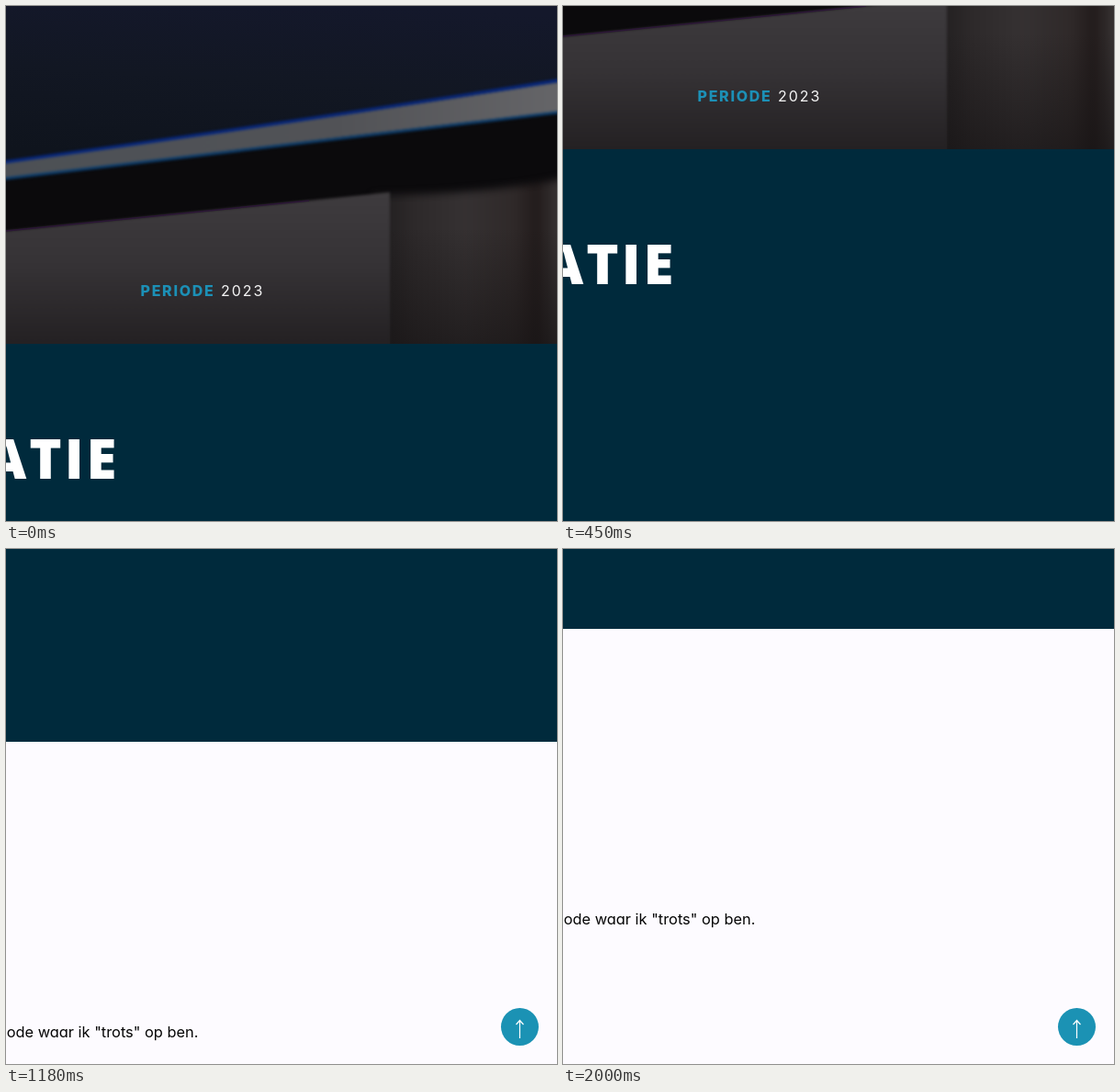
Recreate the animation shown at these times as an HTML page. Size 600 by 561 pixels, loop 2390 ms.

```html
<!DOCTYPE html>
<html lang="nl">
<head>
<meta charset="utf-8">
<title>Scrollende pagina</title>
<style>
  html, body { margin: 0; width: 100%; height: 100%; overflow: hidden; background: #fdfbff; }
  svg { display: block; width: 100vw; height: 100vh; }
  text { font-family: Inter, "Open Sans", sans-serif; }
  .title { font: 800 60px "Open Sans", Inter, sans-serif; letter-spacing: 3px; font-kerning: none; fill: #fff; text-anchor: end; }
  .period { font-size: 16px; letter-spacing: 2px; fill: #f4f4f4; }
  .label { font-weight: 800; letter-spacing: 1.7px; fill: #1c90b6; }
  .body { font-size: 16.4px; fill: #050505; text-anchor: end; font-feature-settings: "cv11"; }
</style>
</head>
<body>
<svg viewBox="0 0 600 561">
  <defs>
    <linearGradient id="sky" x1=".7" y1="0" x2=".5" y2="1">
      <stop offset="0" stop-color="#14182b"/>
      <stop offset=".5" stop-color="#121723"/>
      <stop offset="1" stop-color="#0f141d"/>
    </linearGradient>
    <linearGradient id="strip">
      <stop offset="0" stop-color="#4c5055"/>
      <stop offset=".6" stop-color="#515256"/>
      <stop offset="1" stop-color="#656568"/>
    </linearGradient>
    <linearGradient id="panel" x2="0" y2="1">
      <stop offset="0" stop-color="#3e3b3e"/>
      <stop offset=".45" stop-color="#353235"/>
      <stop offset="1" stop-color="#211e20"/>
    </linearGradient>
    <linearGradient id="curtain">
      <stop offset=".08" stop-color="#242122"/>
      <stop offset=".2" stop-color="#2d292a"/>
      <stop offset=".45" stop-color="#353132"/>
      <stop offset=".7" stop-color="#2f2929"/>
      <stop offset=".81" stop-color="#221b1b"/>
      <stop offset=".93" stop-color="#3a3636"/>
    </linearGradient>
    <linearGradient id="shade" x2="0" y2="1">
      <stop offset=".2" stop-color="#151213" stop-opacity="0"/>
      <stop offset="1" stop-color="#151213" stop-opacity=".6"/>
    </linearGradient>
    <filter id="soft" x="-10%" y="-10%" width="120%" height="120%" color-interpolation-filters="sRGB"><feGaussianBlur stdDeviation="1.4"/></filter>
    <filter id="softer" x="-10%" y="-10%" width="120%" height="120%" color-interpolation-filters="sRGB"><feGaussianBlur stdDeviation="4"/></filter>
    <clipPath id="photo"><path d="M0 0H600V368H0Z"/></clipPath>
  </defs>
  <rect width="600" height="561" fill="#fdfbff"/>
  <g id="page">
    <g clip-path="url(#photo)">
      <rect width="600" height="368" fill="#0b0a0c"/>
      <path d="M0 0H600V81Q300 128 0 171Z" fill="url(#sky)"/>
      <path d="M400 206Q520 206 620 186V390H400Z" fill="url(#curtain)" filter="url(#softer)"/>
      <path d="M418 210H600V368H418Z" fill="url(#shade)"/>
      <path d="M-9 246L418 203V380H-9Z" fill="url(#panel)" filter="url(#soft)"/>
      <path d="M0 245L330 212" stroke="#2b1636" stroke-width="1.5" fill="none"/>
      <g filter="url(#soft)">
        <path d="M-9 172Q300 130 609 82V114Q300 150 -9 189Z" fill="url(#strip)"/>
        <path d="M-9 171Q300 129 609 80" fill="none" stroke="#06277e" stroke-width="3.5"/>
        <path d="M-9 189Q300 151 609 115" fill="none" stroke="#0b3c6c" stroke-width="3"/>
      </g>
      <text class="period label" x="146.5" y="316">PERIODE</text>
      <text class="period" x="234" y="316">2023</text>
    </g>
    <rect y="368" width="600" height="441" fill="#002a3c"/>
    <text class="title" x="123.5" y="515">ATIE</text>
    <text class="body" x="209.5" y="1131">ode waar ik "trots" op ben.</text>
  </g>
  <g id="toTop">
    <circle cx="559.5" cy="520.5" r="20.5" fill="#1b92b4"/>
    <path d="M559.5 533V513.5M555.5 518L559.5 513.5L563.5 518" fill="none" stroke="#fff" stroke-width="1.2"/>
  </g>
</svg>
<script>
const LOOP = 2390;
// [time in ms, scroll distance in px]: two long swipes and a short one
const path = [
  [0, 0], [150, 17], [330, 95], [450, 212], [550, 265], [650, 302], [760, 327],
  [850, 356], [960, 430], [1090, 541], [1180, 599], [1290, 632], [1400, 647],
  [1460, 650], [1550, 667], [1640, 687], [1750, 704], [1880, 716], [2000, 722]
];
const page = document.getElementById("page");
const toTop = document.getElementById("toTop");

const secant = i => (path[i + 1][1] - path[i][1]) / (path[i + 1][0] - path[i][0]);

function slope(i) {
  if (i === 0 || i === path.length - 1) return 0;
  const a = secant(i - 1), b = secant(i);
  return 2 * a * b / (a + b);
}

// Monotone cubic through the points
function scrollAt(t) {
  const i = path.findIndex(p => p[0] > t) - 1;
  if (i < 0) return path[path.length - 1][1];
  const [t0, y0] = path[i], [t1, y1] = path[i + 1];
  const d = t1 - t0, u = (t - t0) / d, v = 1 - u;
  return y0 * v * v * (1 + 2 * u) + y1 * u * u * (3 - 2 * u)
    + d * u * v * (slope(i) * v - slope(i + 1) * u);
}

// The picture advances every 30 ms, with two slightly longer steps
function snap(t) {
  const shift = t < 520 ? 0 : t < 1370 ? 10 : 20;
  return Math.floor((t - shift) / 30) * 30 + shift;
}

function draw(time) {
  const t = snap(time % LOOP);
  page.setAttribute("transform", `translate(0 ${-Math.round(scrollAt(t))})`);
  toTop.setAttribute("opacity", Math.min(1, Math.max(0, (t - 850) / 150)));
}

const start = performance.now();
function tick() {
  draw(performance.now() - start);
  requestAnimationFrame(tick);
}
tick();
</script>
</body>
</html>
```
